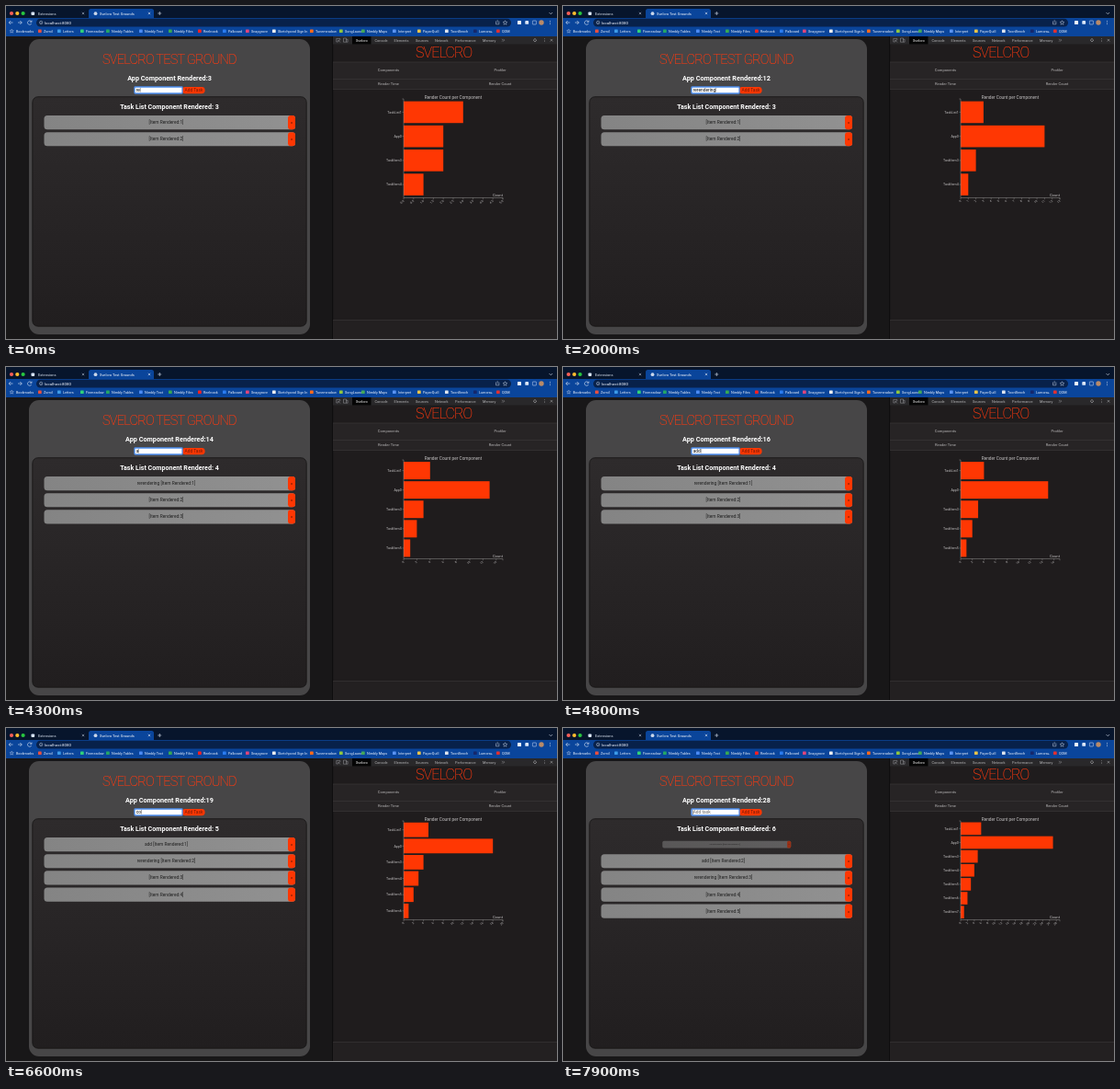
An HTML page that plays this animation: 600 px wide and 362 px high, repeating every 8000 ms.

```html
<!DOCTYPE html>
<html lang="en">
<head>
<meta charset="utf-8">
<title>Svelcro Test Grounds</title>
<style>
  html, body { margin: 0; width: 100%; height: 100%; overflow: hidden; background: #181718; }
  svg { display: block; width: 100vw; height: 100vh; font-family: Roboto, Inter, sans-serif; }
  .thin { font-weight: 100; fill: #ff3a10; stroke: #ff3a10; stroke-width: .15; }
  .bold { font-weight: 700; fill: #fff; }
</style>
</head>
<body>
<svg id="stage" viewBox="0 0 600 362">
  <defs>
    <linearGradient id="panel" x2="0" y2="1"><stop stop-color="#2e2b2c"/><stop offset="1" stop-color="#211e1f"/></linearGradient>
    <linearGradient id="row"><stop stop-color="#848484"/><stop offset="1" stop-color="#919191"/></linearGradient>
  </defs>
  <g id="fixed"></g>
  <g id="live"></g>
</svg>
<script>
const LOOP = 8000, RED = '#ff3703', BLUE = '#0a459b';
const fixed = document.getElementById('fixed'), live = document.getElementById('live');

const rect = (x, y, w, h, fill, r = 0, extra = '') =>
  `<rect x="${x}" y="${y}" width="${w}" height="${h}" rx="${r}" fill="${fill}" ${extra}/>`;
const dot = (x, y, r, fill) => `<circle cx="${x}" cy="${y}" r="${r}" fill="${fill}"/>`;
const line = (d, stroke = '#dde6f5', w = .6) =>
  `<path d="${d}" fill="none" stroke="${stroke}" stroke-width="${w}"/>`;
const text = (s, x, y, size, fill, anchor = 'start', extra = '') =>
  `<text x="${x}" y="${y}" font-size="${size}" fill="${fill}" text-anchor="${anchor}" ${extra}>${s}</text>`;
const cross = (x, y, r, color) =>
  line(`M${x - r} ${y - r}l${2 * r} ${2 * r}m0 ${-2 * r}l${-2 * r} ${2 * r}`, color, .5);

function browser() {
  const bookmarks = [
    ['Zomil', 41, '#e8503f'], ['Letters', 62, '#3c9be8'], ['Finmeadow', 87, '#2fd07a'],
    ['Nimbly Tables', 115, '#23a566'], ['Nimbly Text', 151, '#4a8af4'], ['Nimbly Files', 183, '#38a852'],
    ['Reelnook', 215, '#ff2020'], ['Palboard', 242, '#2a7cf0'], ['Snapgrove', 267, '#e0457a'],
    ['Sketchpond Sign In', 296, '#f0f0f0'], ['Tunemeadow', 337, '#ff6a1a'], ['SongLaunch', 369, '#8fc63f'],
    ['Nimbly Maps', 393, '#43a85a'], ['Interpret', 427, '#5a93f2'], ['PaperQuill', 454, '#e9c34a'],
    ['ToonBench', 484, '#dfe5ee'], ['Lumora+', 515, '#15276b'], ['QOM', 540, '#e33030']
  ];
  return rect(0, 0, 600, 14, '#07152c') + rect(0, 13, 600, 20, BLUE) +
    [['#ff5f57', 6], ['#febc2e', 12.3], ['#28c840', 18.6]].map(([c, x]) => dot(x, 8, 2.1, c)).join('') +
    rect(27.5, 6.4, 3.6, 3.6, '#d8e4f8', .8) + text('Extensions', 35, 9.6, 4, '#e0e8f5') + cross(84, 8, 1.2, '#c9d4e6') +
    rect(90, 3, 71, 12, BLUE, 2.5) + dot(97.5, 8.2, 1.9, '#c9d6ea') +
    text('Svelcro Test Grounds', 102, 9.6, 4, '#fff') + cross(156, 8, 1.2, '#fff') +
    line('M165.3 8h4m-2-2v4') + line('M591.5 7l1.8 1.8 1.8-1.8') +
    line('M7.5 18H3.2m2-2l-2 2 2 2M13 18h4.3m-2-2l2 2-2 2') +
    line('M27.7 17.2a2.2 2.2 0 1 0 0 1.8m.3-3.4v1.8h-1.8') +
    rect(33, 13.8, 517, 8.7, '#08214a', 4.3) +
    `<circle cx="38.2" cy="18" r="1.7" fill="none" stroke="#c9d4e6" stroke-width=".5"/>` +
    line('M38.2 17.6v1.4', '#c9d4e6', .5) + text('localhost:8080', 42, 19.7, 4.4, '#f2f6ff') +
    line('M533.5 16.5v3.3h3.4v-3.3M535.2 18.3v-3.2M543.5 15.8l.7 1.5 1.6.2-1.2 1.1.3 1.6-1.4-.8-1.4.8.3-1.6-1.2-1.1 1.6-.2z', '#c9d4e6', .5) +
    rect(557, 16, 4, 4, '#f5f7fa', .6) + rect(565.3, 16, 3.8, 3.8, '#dce7fa', .9) +
    rect(573.4, 16, 4, 4, 'none', .4, 'stroke="#dce7fa" stroke-width=".5"') +
    dot(583, 18, 2.7, '#b98a68') + [16.3, 18, 19.7].map(y => dot(592.5, y, .45, '#fff')).join('') +
    line('M6.2 25.2l.6 1.3 1.4.2-1 1 .3 1.4-1.3-.7-1.3.7.3-1.4-1-1 1.4-.2z', '#e6eefc', .4) +
    text('Bookmarks', 11, 28.7, 3.8, '#eef4ff') +
    bookmarks.map(([s, x, c]) => rect(x - 6, 25.4, 3.7, 3.7, c, .6) + text(s, x, 28.7, 3.8, '#eef4ff')).join('');
}

function page() {
  return rect(0, 32.5, 355, 330, '#181718') +
    rect(25, 36, 306, 321, '#474647', 11) +
    text('SVELCRO TEST GROUND', 105, 63, 14.5, RED, 'start', 'class="thin" letter-spacing="-.75"') +
    rect(28.8, 98.7, 298.4, 249.5, 'url(#panel)', 6, 'stroke="#151314" stroke-width=".8"') +
    rect(191.8, 88, 24.8, 7.2, RED, 3.4) + text('Add Task', 204.5, 93.3, 4.85, '#6d1a08', 'middle') +
    rect(140, 88, 52, 7, '#fff', .8, 'stroke="#4f8fee" stroke-width="1.3"');
}

function devtools() {
  const tabs = [['Svelcro', 381], ['Console', 401.5], ['Elements', 422.5], ['Sources', 446], ['Network', 467],
    ['Performance', 489], ['Memory', 519]];
  const rule = y => line(`M356 ${y}H600`, '#3d3a3b', .6);
  return rect(355, 32.5, 245, 330, '#1f1c1d') + rect(355, 32.5, 1.2, 330, '#0e0d0e') +
    rect(356, 32.5, 244, 9, '#29282a') + rect(377, 32.5, 20.5, 9, '#050505') +
    tabs.map(([s, x], i) => text(s, x, 38.7, 3.9, i ? '#b4b4b6' : '#fff')).join('') +
    line('M540 35.8l1.3 1.4-1.3 1.4m1.5-2.8l1.3 1.4-1.3 1.4', '#b4b4b6', .4) +
    line('M361.5 39h-1.7v-3.6h4v1.7m-2 .2l2.2 2.2m-2.2-.6v-1.6h1.6M367.5 35h3v4.2h-3zm3 1.3h1.6v2.9h-1.6', '#a9a9ac', .45) +
    `<circle cx="576" cy="37.2" r="1.4" fill="none" stroke="#b4b4b6" stroke-width=".9" stroke-dasharray=".8 .3"/>` +
    [35.7, 37.2, 38.7].map(y => dot(586.5, y, .4, '#b4b4b6')).join('') + cross(594, 37.2, 1.3, '#b4b4b6') +
    rect(356, 61, 244, 29.5, '#272425') + rule(61) + rule(79.5) + rule(90.5) +
    text('SVELCRO', 446, 56.4, 16, RED, 'start', 'class="thin" letter-spacing="-.85"') +
    [['Components', 416.5, 70.7], ['Profiler', 538, 70.7], ['Render Time', 416.5, 85.6], ['Render Count', 538, 85.6]]
      .map(([s, x, y]) => text(s, x, y, 4.1, '#b9b7b8', 'middle')).join('') +
    rect(356, 341.5, 244, 20.5, '#232021') + rule(341.5);
}

// Typing script: a null character submits the task.
const events = [];
function typeWord(word, start, gap, submit) {
  [...word].forEach((ch, i) => events.push([start + i * gap, ch]));
  events.push([submit, null]);
}
typeWord('rerendering', -210, 180, 2015);
typeWord('add', 4200, 200, 5010);
typeWord('components', 6400, 125, 7815);

function stateAt(t) {
  const s = { input: '', renders: 1, lists: 3, last: -210, added: -1e4,
    items: [{ name: '', n: 1 }, { name: '', n: 2 }] };
  for (const [at, ch] of events) {
    if (at > t) break;
    s.renders++;
    s.last = at;
    if (ch) { s.input += ch; continue; }
    s.items.forEach(item => item.n++);
    s.items.unshift({ name: s.input + ' ', n: 1 });
    s.input = '';
    s.lists++;
    s.added = at;
  }
  return s;
}

function taskRow(item, i, grow) {
  const y = 119 + 18.15 * i, shrink = 1 - grow;
  const body = rect(41.5, y, 273.5, 15.2, 'url(#row)', 3.5) + rect(307, y, 8, 15.2, RED, 3) +
    text(`${item.name}[Item Rendered:${item.n}]`, 174.5, y + 9.1, 4.85, '#1d1d1d', 'middle') +
    text('x', 311, y + 9.1, 4.4, '#4a1206', 'middle');
  if (grow >= 1) return body;
  return `<g opacity="${grow}" transform="matrix(${grow} 0 0 ${grow} ${178.25 * shrink} ${(y + 7.6) * shrink})">${body}</g>`;
}

function tickStep(span) {
  const raw = span / 10, power = 10 ** Math.floor(Math.log10(raw)), err = raw / power;
  return power * (err >= Math.sqrt(50) ? 10 : err >= Math.sqrt(10) ? 5 : err >= Math.SQRT2 ? 2 : 1);
}

function chart(s) {
  const left = 433, top = 101, width = 108, height = 107.5, bottom = top + height;
  const bars = [['TaskList1', s.lists], ['App0', s.renders - 1]];
  [...s.items].sort((a, b) => b.n - a.n).forEach((item, i) => bars.push([`TaskItem${i + 3}`, item.n]));
  const max = Math.max(...bars.map(b => b[1])) + 2, unit = width / max;
  const band = height / (bars.length + .1), step = tickStep(max), grey = '#a09d9e';
  let out = text('Render Count per Component', 487, 100.8, 4.75, '#c4c2c3', 'middle');
  bars.forEach(([name, n], i) => {
    const y = top + band * (i + .1), mid = y + band * .45;
    out += rect(left, y, n * unit, band * .9, RED) + line(`M${left - 1.5} ${mid}h1.5`, grey, .4) +
      text(name, left - 2.2, mid + 1.2, 3.6, '#c4c2c3', 'end');
  });
  out += line(`M${left - 1.5} ${top}H${left}V${bottom}H${left + width}v1.8`, grey, .45);
  for (let v = 0; v <= max + 1e-6; v += step) {
    const x = left + v * unit, lx = x + .8, ly = bottom + 3.6;
    out += line(`M${x} ${bottom}v1.8`, grey, .4) +
      text(v.toFixed(step < 1 ? 1 : 0), lx, ly, 3.3, '#b5b3b4', 'end', `transform="rotate(-45 ${lx} ${ly})"`);
  }
  return out + text('Count', 541, 206.7, 4.2, '#c4c2c3', 'end');
}

function scene(t) {
  const s = stateAt(t);
  const grow = 1 - (1 - Math.min(1, (t - s.added) / 400)) ** 3;
  const caretOn = (t - s.last) % 1000 < 500;
  const caret = caretOn && s.input ? '<tspan fill="#111" font-size="5" dx="-.3">|</tspan>' : '';
  return text('App Component Rendered:' + s.renders, 178, 80.6, 7.25, '#fff', 'middle', 'class="bold"') +
    text('Task List Component Rendered: ' + s.lists, 178, 111.6, 7.1, '#fff', 'middle', 'class="bold"') +
    text((s.input || 'Add task') + caret, 141.7, 93.2, 4.85, s.input ? '#111' : '#666') +
    (caretOn && !s.input ? rect(141.3, 89.2, .4, 5, '#111') : '') +
    s.items.map((item, i) => taskRow(item, i, i ? 1 : grow)).join('') + chart(s);
}

fixed.innerHTML = page() + devtools() + browser();
const begin = performance.now();
let shown = -1;
function draw() {
  // Time advances in tenths of a second.
  const t = Math.floor((performance.now() - begin + 10) / 100) * 100 % LOOP;
  if (t !== shown) live.innerHTML = scene(shown = t);
  requestAnimationFrame(draw);
}
draw();
</script>
</body>
</html>
```
